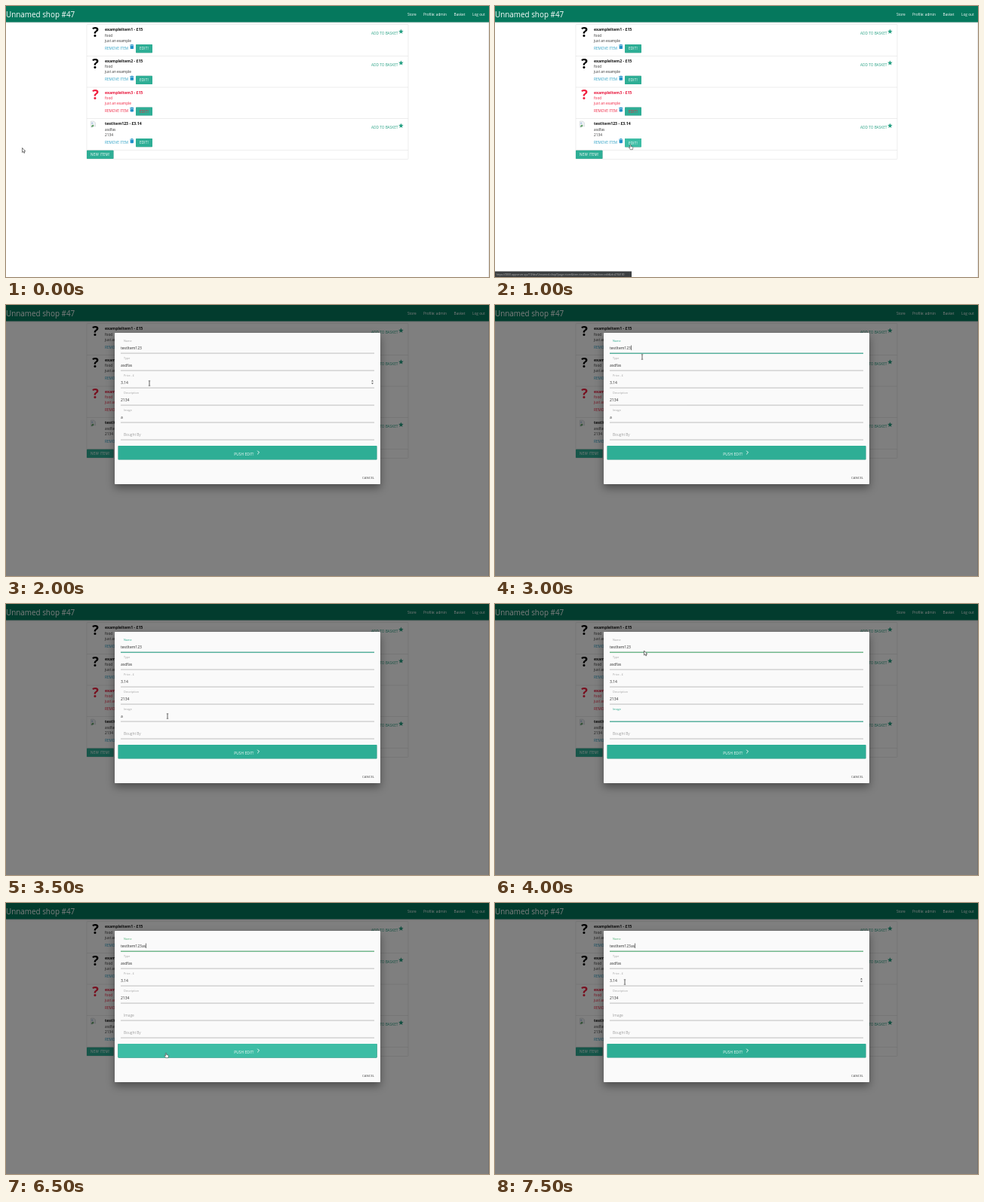
Recreate the animation shown at these times as an HTML page. Size 640 px wide and 360 px high, loop 8 s.

```html
<!DOCTYPE html>
<html lang="en">
<head>
<meta charset="utf-8">
<title>Unnamed shop</title>
<style>
html, body { margin: 0; width: 100%; height: 100%; overflow: hidden; background: #fff; }
svg { display: block; width: 640px; height: 360px; font: 4.75px "Open Sans", "Noto Sans", sans-serif; fill: #333; }
text { white-space: pre; }
.title { font-size: 5.18px; font-weight: 700; fill: #111; }
.red text { fill: #f0203f; }
.red .title { fill: #e81238; }
.link { fill: #2a9fc4; }
.add { fill: #26a083; }
.btn { fill: #2eae95; filter: drop-shadow(0 .8px .7px rgba(0,0,0,.3)); }
.hover { fill: #3dbda5; }
.caps { font-size: 4.65px; letter-spacing: .2px; fill: #fff; text-anchor: middle; }
.modal { fill: #fafafa; filter: drop-shadow(0 5px 6px rgba(0,0,0,.4)); }
.label { font-size: 3.75px; fill: #a0a0a0; }
.hint { fill: #9e9e9e; }
.input { font-size: 5px; fill: #2c2c2c; }
.rule { fill: #a3a3a3; }
.focus { fill: #26a68a; }
.valid { fill: #4caf72; }
[data-on] { visibility: hidden; }
</style>
</head>
<body>
<svg id="stage" viewBox="0 0 640 360"></svg>
<script>
const LOOP = 8000;
const stage = document.getElementById("stage");

const text = (x, y, s, cls = "") => `<text x="${x}" y="${y}" class="${cls}">${s}</text>`;
const rect = (x, y, w, h, attrs = "") => `<rect x="${x}" y="${y}" width="${w}" height="${h}" ${attrs}/>`;
const cls = name => `class="${name}"`;
const button = (x, y, w, h, s, extra = "") =>
  rect(x, y, w, h, `rx=".7" class="btn ${extra}"`) + text(x + w / 2, y + h / 2 + 1.8, s, "caps");
// Shows the content only within the listed "from-to" spans (ms).
const during = (spans, content) => `<g data-on="${spans}">${content}</g>`;

function star(cx, cy, r) {
  const points = Array.from({ length: 10 }, (_, i) => {
    const a = i * Math.PI / 5 - Math.PI / 2, d = i % 2 ? r * .45 : r;
    return `${(cx + d * Math.cos(a)).toFixed(2)},${(cy + d * Math.sin(a)).toFixed(2)}`;
  });
  return `<polygon points="${points.join(" ")}" class="add"/>`;
}

const trash = `<path d="M164.2 51.6h1.4l.4-.6h1.6l.4.6h1.4v.9h-5.2zM164.6 53h4.4v3.2q0 .9-.9.9h-2.6q-.9 0-.9-.9z" fill="#2191c9"/>`;
const picture = text(118.5, 41, "?", 'mark" font-size="18" font-weight="700" text-anchor="middle" fill="#000');
const broken = `<path d="M112.5 28h4l2 2v5l-2-1-2 2h-2z" fill="#eef1f4" stroke="#c3c8cc" stroke-width=".5"/>
  <path d="M113 34.6l2-2.2 1.6 1.4-1.4 1.6h-2.2z" fill="#5a9d62"/><circle cx="114.3" cy="30.6" r=".9" fill="#9bb8dc"/>`;

function item([title, type, note, red, noImage], i) {
  return `<g transform="translate(0 ${(i * 41.7).toFixed(1)})" class="${red ? "red" : ""}">
    ${noImage ? broken : picture}
    ${text(131, 33.3, title, "title")}${text(131, 40.7, type)}${text(131, 47.8, note)}
    ${text(131, 57.7, "REMOVE ITEM", "link")}${trash}
    ${button(172, 51, 22, 11.2, "EDIT!")}
    ${red ? "" : text(484, 37.9, "ADD TO BASKET", "add") + star(523.4, 34, 3.4)}
    ${rect(107, 66, 426, .6, 'fill="#e2e2e2"')}
  </g>`;
}

const items = [
  ["exampleItem1 - £15", "food", "just an example"],
  ["exampleItem2 - £15", "food", "just an example"],
  ["exampleItem3 - £15", "food", "just an example", true],
  ["testItem123 - £3.14", "asdfas", "2134", false, true]
];

const page = `
  ${rect(0, 0, 640, 360, 'fill="#fff"')}
  ${rect(639, 21, 1, 339, 'fill="#e6e6e6"')}
  ${rect(0, 0, 640, 21.5, 'fill="#05785d" style="filter:drop-shadow(0 .8px .8px rgba(0,0,0,.25))"')}
  <g fill="#fff">${text(0, 14.7, "Unnamed shop #47", '" font-size="9.9')}
  ${text(532, 12.8, "Store")}${text(553, 12.8, "Profile: admin")}${text(593.6, 12.8, "Basket")}${text(618, 12.8, "Log out")}</g>
  ${rect(107, 24.5, 426, 179, 'rx=".8" fill="none" stroke="#e2e2e2" stroke-width=".6"')}
  ${items.map(item).join("")}
  ${during("1000-1500", button(172, 176.1, 22, 11.2, "EDIT!", "hover"))}
  ${button(107, 191.8, 35.5, 11.2, "NEW ITEM!")}`;

const ROW = 23;
const label = (i, s, c = "label") => text(156, 49.3 + i * ROW, s, c);
const value = (i, s) => text(152, 58.7 + i * ROW, s, "input");
const rule = (i, c = "rule", h = .7) => rect(152, 63.7 + i * ROW, 336, h, cls(c));
const caret = (x, i) => rect(x, 53.6 + i * ROW, .6, 6.4, 'fill="#222"');
const spinner = `<path d="M484 101.6l1.5-1.9 1.5 1.9zM484 103.4l1.5 1.9 1.5-1.9z" fill="#555"/>`;

const dialog = `
  ${rect(0, 0, 640, 360, 'fill="#000" opacity=".5"')}
  ${rect(144, 37, 352, 201, 'rx=".7" class="modal"')}
  ${[0, 1, 2, 3, 4, 5].map(i => rule(i)).join("")}
  ${["Type", "Price - £", "Description"].map((s, i) => label(i + 1, s)).join("")}
  ${["asdfas", "3.14", "2134"].map((s, i) => value(i + 1, s)).join("")}
  ${text(156, 173.7, "Bought By", "hint")}

  ${during("1500-2500,4000-5000", label(0, "Name"))}
  ${during("2500-4000", label(0, "Name", "label focus") + rule(0, "focus", 1))}
  ${during("4000-8000", rule(0, "valid", 1))}
  ${during("5000-8000", label(0, "Name", "label valid"))}
  ${during("1500-5000", value(0, "testItem123"))}
  ${during("5000-8000", value(0, "testItem123as"))}
  ${during("2500-3500", caret(180, 0))}
  ${during("5000-5500,6000-7000,7500-8000", caret(185.2, 0))}

  ${during("1500-4000", label(4, "Image") + value(4, "a"))}
  ${during("4000-5000", label(4, "Image", "label focus") + rule(4, "focus", 1))}
  ${during("4500-5000", caret(152.2, 4))}
  ${during("5000-8000", text(156, 150.7, "Image", "hint"))}
  ${during("2000-2500,7500-8000", spinner)}

  ${button(148.5, 187, 343, 18.4, "")}
  ${during("6500-7000", button(148.5, 187, 343, 18.4, "", "hover"))}
  ${text(315.4, 199.7, "PUSH EDIT!", "caps")}
  <path d="M333.2 193.7l2.3 2.3-2.3 2.3" fill="none" stroke="#fff" stroke-width=".9"/>
  ${text(472, 230.7, "CANCEL", '" font-size="4.3" fill="#444')}`;

const statusBar = rect(0, 352.5, 181, 7.5, 'fill="#3c3f41"') +
  text(2, 357.6, "https://0000.appserver.xyz/10/dev/Unnamed-shop/?page=store&amp;item=testItem123&amp;action=edit&amp;id=4704100", '" font-size="3.35" fill="#b4b4b4');

const pointers = `
  <path id="arrow" d="M0 0v6l1.4-1.2 1 2.1 1-.5-1-2h1.8z" fill="#fff" stroke="#222" stroke-width=".6"/>
  <path id="hand" d="M-.6.4q.6-.9 1.2 0v2.2l2.3.6q.6.2.5.9l-.5 2.6h-3.2l-1.9-2.6q.2-.8 1-.3l.6.5z" fill="#fff" stroke="#222" stroke-width=".5"/>
  <path id="beam" d="M-1.2-3.2h.7l.5.4.5-.4h.7M0-2.8v5.6M-1.2 3.2h.7l.5-.4.5.4h.7" fill="none" stroke="#222" stroke-width=".7"/>`;

stage.innerHTML = page + during("1500-8000", dialog) + during("1000-2000", statusBar) + pointers;

// Pointer shape and place, one step per half second.
const STEP = 500;
const path = [
  ["arrow", 21.5, 188.5], ["arrow", 150, 117], ["hand", 179.5, 184], ["beam", 207, 126.6],
  ["beam", 190, 104], ["beam", 186, 59], ["beam", 195, 69], ["beam", 214, 149],
  ["arrow", 197.5, 62], ["beam", 195, 58], ["beam", 192, 57], ["beam", 208, 128],
  ["beam", 210, 170], ["hand", 212, 199], ["beam", 190, 150], ["beam", 172, 105]
];

const timed = [...stage.querySelectorAll("[data-on]")].map(el => ({
  el, spans: el.dataset.on.split(",").map(s => s.split("-").map(Number))
}));
const shapes = ["arrow", "hand", "beam"].map(id => document.getElementById(id));
const start = performance.now();

function draw(now) {
  const t = Math.max(0, now - start) % LOOP;
  for (const { el, spans } of timed)
    el.style.display = spans.some(([a, b]) => t >= a && t < b) ? "" : "none";
  const [shape, x, y] = path[Math.floor(t / STEP)];
  for (const el of shapes) {
    el.style.display = el.id === shape ? "" : "none";
    el.setAttribute("transform", `translate(${x} ${y})`);
  }
  requestAnimationFrame(draw);
}

for (const { el } of timed) el.style.visibility = "visible";
draw(start);
</script>
</body>
</html>
```
